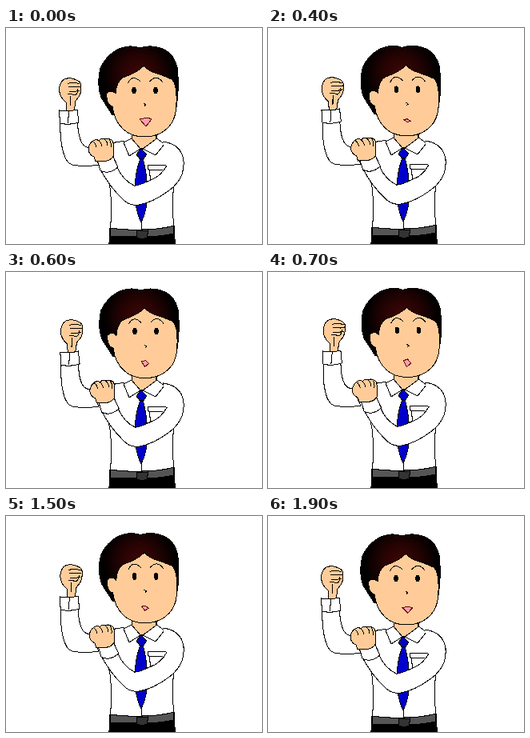
An HTML page that plays this animation: 320 px wide and 270 px high, repeating every 2000 ms.

```html
<!DOCTYPE html>
<html lang="en">
<head>
<meta charset="utf-8">
<title>Fist pump</title>
<style>
html, body { margin: 0; width: 100%; height: 100%; overflow: hidden; background: #fff; }
svg { display: block; width: 100vw; height: 100vh; }
.ink { fill: none; stroke: #000; stroke-width: 1.04; stroke-linejoin: round; }
.skin { fill: #fc9; }
.shirt { fill: #fff; }
</style>
</head>
<body>
<svg viewBox="0 0 320 270" class="ink" shape-rendering="crispEdges">
  <defs>
    <radialGradient id="brown" gradientUnits="userSpaceOnUse" cx="166" cy="58" r="46">
      <stop offset="0" stop-color="#400606"/>
      <stop offset=".5" stop-color="#260303"/>
      <stop offset="1" stop-color="#000"/>
    </radialGradient>
  </defs>

  <path d="M130 256L128.500 275H212L210 253Z" fill="#000"/>

  <g id="torso">
    <path class="shirt" stroke="none" d="M147 141L132 144L114 171L127 181Q132 205 132 225L130 251L210 248L208 225L209 200L222 178L198 143Z"/>
    <path d="M127.500 180Q128 192 130 200Q133 225 130.500 250M209.500 198Q207 225 210 248M169.500 242V253"/>
    <path d="M132 143.500Q140 143 148 141"/>
    <path d="M200 171.500H177.500L178 177L196 178M179.500 178L180.500 190"/>
    <path class="skin" d="M158 130L157 139L169 152L188 139V130Z"/>
    <path class="shirt" d="M157 138L147 143L154 160L168 151ZM188.500 138L198 145L187 159L171 151Z"/>
    <path fill="#00c" d="M168 163Q160 185 161.500 205Q161 228 169 243Q177 228 176.500 205Q177 185 171 163Z"/>
    <path fill="#00c" d="M169 150.500L163 158L167.500 164H172L175.500 158Z"/>
    <path fill="#555" d="M130 250Q148 253 170 252Q192 252 210 247V257Q190 261 170 261L130 260Z"/>
    <path fill="#333" d="M163 254L178 253L176 262Q170 265 164 262Z"/>
  </g>

  <g id="raised">
    <path class="shirt" d="M68 118C67 147 73 169 83 171Q98 174 116 171L106 150Q99 150 95 144Q90 135 89.500 118Z"/>
    <path class="skin" d="M76 105L75 93Q67 87 66.500 77Q67 67 73 64Q81 61 88 65Q94 67 94 73Q94 82 91 86L87 91L85 105Z"/>
    <path d="M77 69.500Q85 67 92 70M78 74Q84 73 88 74L93 73M79 79Q84 80 88 79L92 78M77 83Q82 82 86 84Q90 82 90 76M80.500 85V97"/>
    <path class="shirt" d="M66.500 103Q78 105 89 102L91 118Q79 122 67.500 119Z"/>
    <path d="M78.500 104L77.500 119"/>
  </g>

  <g id="folded">
    <path class="shirt" d="M196 142C220 145 226 163 220 183Q215 195 204 203Q184 218 166 221Q154 223 145 213Q130 199 118 177L139 174Q146 190 160 197Q164 198 181 190Q193 186 201 172"/>
    <path class="shirt" d="M114 165L118 178Q128 184 140 174L134 161Z"/>
    <path class="skin" d="M112 167L110 161Q103 158 103 151Q104 144 109 141Q113 138 116 141Q119 137 123 139Q127 137 130 139Q134 139 134.500 147V160Q131 165 126 166Z"/>
    <path d="M109 142Q112 144 113 149M116 141Q119 143 120 148M123 139Q127 142 127 147M129 139.500Q132 143 131 149"/>
  </g>

  <g id="head">
    <path fill="url(#brown)" d="M133 109L119 87Q113 70 118 50Q125 35 139 27Q155 20 167 25Q182 20 198 27Q210 33 214 49Q217 75 213 99Z"/>
    <path class="skin" d="M172.500 47Q164 56 146 62Q138 67 137 82Q131 76 126 82Q125 96 133 98Q135 116 147 127Q157 136 173 136Q195 136 207 119Q213 109 213 95Q214 70 207 64Q196 59 186 56Q177 53 172.500 47Z"/>
    <g id="gaze">
      <path d="M152.500 69Q158 57 168 67M179.500 67Q188 57 196 68"/>
      <ellipse cx="160" cy="78" rx="2.700" ry="4.400" fill="#000" stroke="none"/>
      <ellipse cx="187" cy="78" rx="2.700" ry="4.400" fill="#000" stroke="none"/>
    </g>
    <path d="M172 94L175 96L173 97.500"/>
    <path id="mouth" fill="#f9a0b0" stroke="#600"/>
  </g>
</svg>
<script>
const part = id => document.getElementById(id);
const move = (id, transform) => part(id).setAttribute("transform", transform);

// left, top, right and bottom corners
const smile = [167, 114, 177, 112, 182, 114, 175, 123];
const shut = [170, 115.5, 174, 115.5, 178, 117, 174, 117.5];
const gasp = [168, 115, 173, 113, 177.5, 118, 172, 123];
const mix = (a, b, u) => a.map((v, i) => v + (b[i] - v) * u);

// counts 0 to 7, holds, then counts back
function stepAt(t) {
  const tick = Math.floor(t / 100);
  return tick < 14 ? Math.min(tick, 7) : 20 - tick;
}

function draw(now) {
  const step = stepAt(now % 2000);
  // the smile closes first, then the body rises
  const p = Math.max(0, step - 3) / 4;
  const rise = -4 * p;
  move("torso", `translate(0 ${rise})`);
  // the raised arm leans in from the elbow
  move("raised", `matrix(1 0 ${-.027 * p} 1 ${4.6 * p} ${rise})`);
  const sx = 1 - .02 * p;
  move("folded", `matrix(${sx} 0 0 1 ${222 * (1 - sx)} ${rise})`);
  const sy = 1 - .017 * p;
  move("head", `matrix(1 0 0 ${sy} ${1.3 * p} ${23 * (1 - sy) - 2.6 * p})`);
  move("gaze", `translate(0 ${-1.6 * p})`);
  const m = step < 3 ? mix(smile, shut, step / 3) : mix(shut, gasp, p);
  part("mouth").setAttribute("d", `M${m}Z`);
  requestAnimationFrame(draw);
}
draw(0);
</script>
</body>
</html>
```
